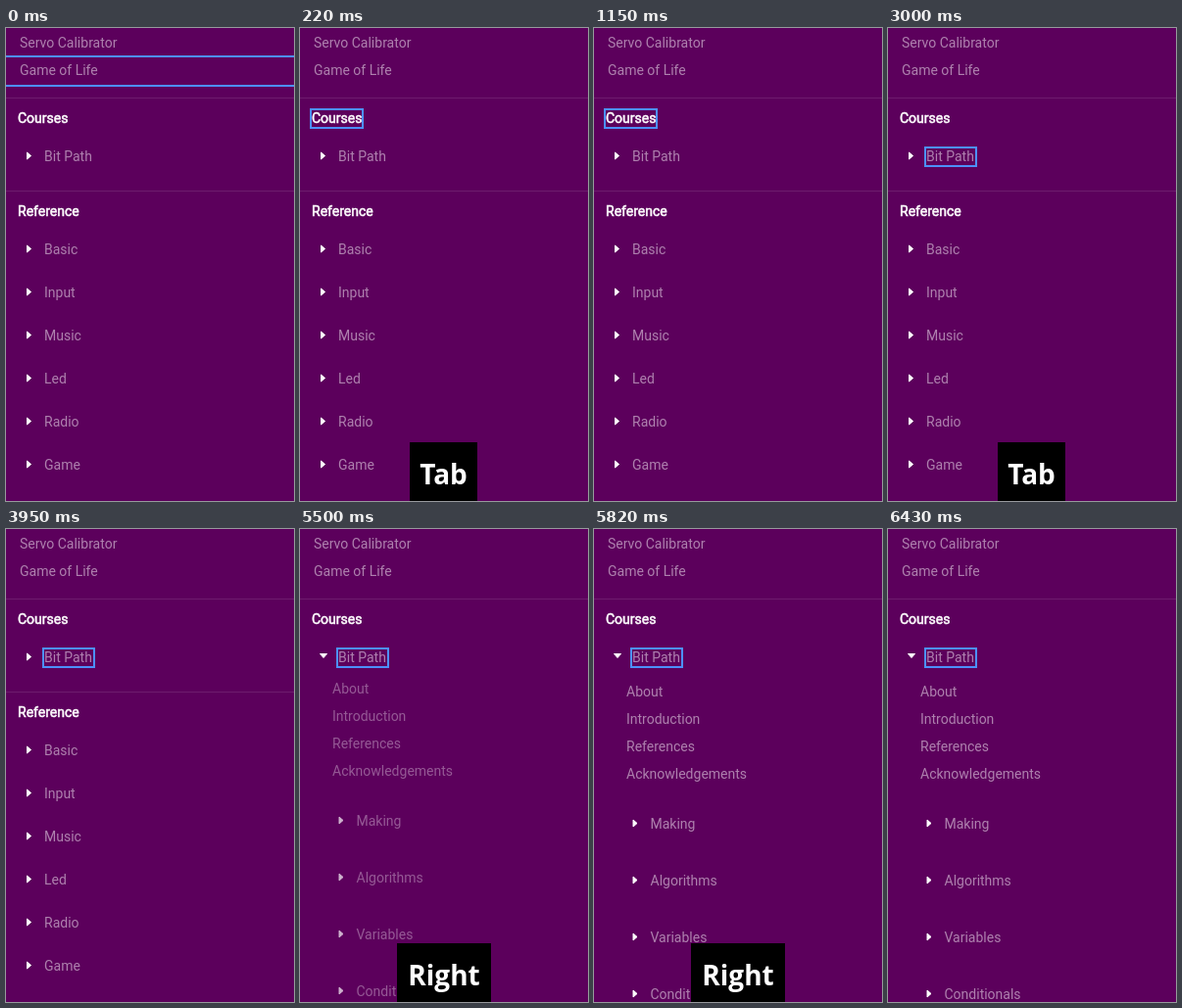
An HTML page that plays this animation: 294 by 483 pixels, repeating every 8000 ms.

```html
<!DOCTYPE html>
<html lang="en">
<head>
<meta charset="utf-8">
<title>Keyboard navigation in a side menu</title>
<style>
html, body { margin: 0; width: 100%; height: 100%; overflow: hidden; background: #5c005c; }
svg { display: block; width: 294px; height: 483px; }
text { font: 14px Roboto, sans-serif; fill: #ae80ae; }
.heading { fill: #fff; stroke: #fff; stroke-width: .55px; }
.line { fill: #fff; opacity: .11; }
.arrow { fill: #fff; stroke: #fff; stroke-width: 1px; stroke-linejoin: round; }
.focus { fill: none; stroke: #4d90fe; stroke-width: 2px; }
.key text { font: 700 28px "Open Sans", sans-serif; fill: #fff; text-anchor: middle; }

.anim { animation: 8s step-end infinite; }
#focus-game { animation-name: focus-game; }
#focus-courses { animation-name: focus-courses; }
#focus-course { animation-name: focus-course; }
#closed { animation-name: closed; }
#open { animation-name: open; }
#submenu { animation-name: submenu; }
#key-tab { animation-name: key-tab; }
#key-right { animation-name: key-right; }

@keyframes focus-game { 0% { opacity: 1 } 2.75%, 100% { opacity: 0 } }
@keyframes focus-courses { 0% { opacity: 0 } 2.75% { opacity: 1 } 37.5%, 100% { opacity: 0 } }
@keyframes focus-course { 0% { opacity: 0 } 37.5%, 100% { opacity: 1 } }
@keyframes closed { 0% { opacity: 1 } 68.75%, 100% { opacity: 0 } }
@keyframes open { 0% { opacity: 0 } 68.75%, 100% { opacity: 1 } }
@keyframes submenu {
  0% { opacity: 0; transform: translateY(-3px) }
  68.75% { opacity: .7; transform: translateY(-3px) }
  72.75%, 100% { opacity: 1; transform: none }
}
@keyframes key-tab {
  0% { opacity: 0 } 2.75% { opacity: 1 } 14.375% { opacity: 0 }
  37.5% { opacity: 1 } 49.375%, 100% { opacity: 0 }
}
@keyframes key-right { 0% { opacity: 0 } 68.75% { opacity: 1 } 80.375%, 100% { opacity: 0 } }
</style>
</head>
<body>
<svg viewBox="0 0 294 483">
  <defs><path id="arrow" class="arrow" d="M0-3.5 4 0 0 3.5z"/></defs>

  <text x="14" y="20">Servo Calibrator</text>
  <text x="14" y="48">Game of Life</text>
  <rect class="line" y="71" width="294" height="1"/>
  <text class="heading" x="12" y="97">Courses</text>
  <text x="39" y="136">Bit Path</text>

  <g id="closed" class="anim">
    <use href="#arrow" x="21.5" y="130.5"/>
    <rect class="line" y="166" width="294" height="1"/>
    <text class="heading" x="12" y="192">Reference</text>
    <g id="reference"></g>
  </g>

  <g id="open" class="anim">
    <path class="arrow" d="M20.5 127.5h7l-3.5 4z"/>
  </g>
  <g id="submenu" class="anim">
    <text x="33" y="171">About</text>
    <text x="33" y="199">Introduction</text>
    <text x="33" y="227">References</text>
    <text x="33" y="255">Acknowledgements</text>
    <g id="lessons"></g>
  </g>

  <path id="focus-game" class="anim focus" d="M0 29H294M0 59H294"/>
  <rect id="focus-courses" class="anim focus" x="11" y="83" width="53" height="19"/>
  <rect id="focus-course" class="anim focus" x="38" y="122" width="52" height="19"/>

  <g id="key-tab" class="anim key">
    <rect x="112" y="423" width="69" height="60"/>
    <text x="146.5" y="466">Tab</text>
  </g>
  <g id="key-right" class="anim key">
    <rect x="99" y="423" width="96" height="60"/>
    <text x="147" y="466">Right</text>
  </g>
</svg>
<script>
// Fills a group with evenly spaced, collapsed menu entries.
function addEntries(id, labels, x, y, step) {
  document.getElementById(id).innerHTML = labels.map((label, i) => {
    const base = y + i * step;
    return `<use href="#arrow" x="${x - 17.5}" y="${base - 5.5}"/><text x="${x}" y="${base}">${label}</text>`;
  }).join('');
}
addEntries('reference', ['Basic', 'Input', 'Music', 'Led', 'Radio', 'Game'], 39, 231, 44);
addEntries('lessons', ['Making', 'Algorithms', 'Variables', 'Conditionals'], 57.5, 306, 58);
</script>
</body>
</html>
```
